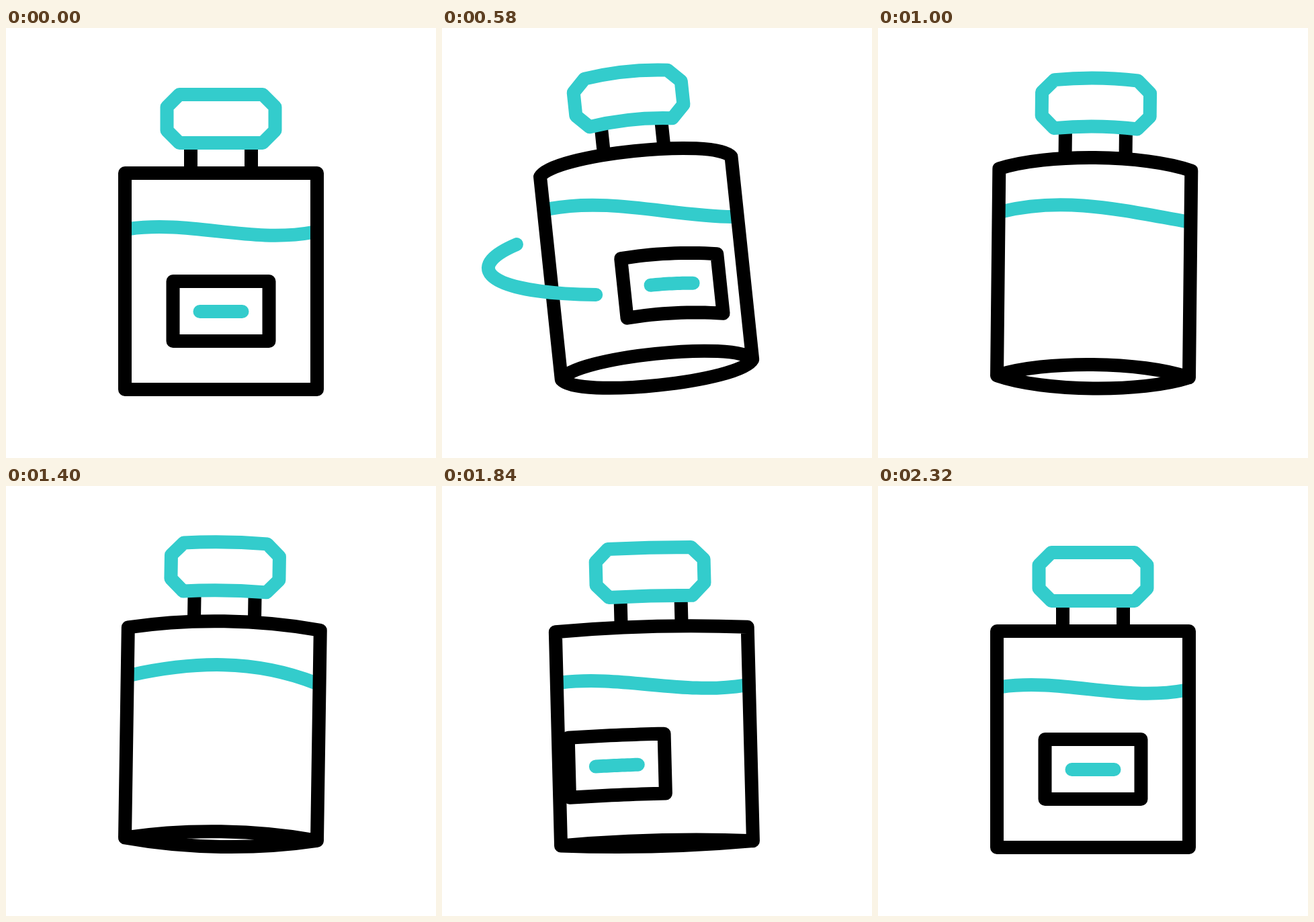
An HTML page with a canvas that plays this animation: 640 by 640 pixels, repeating every 2400 ms.

```html
<!DOCTYPE html>
<html lang="en">
<head>
<meta charset="utf-8">
<title>Bottle</title>
<style>
html, body { margin: 0; width: 100%; height: 100%; overflow: hidden; background: #fff; }
canvas { display: block; width: 640px; height: 640px; }
</style>
</head>
<body>
<canvas id="stage" width="640" height="640"></canvas>
<script>
const ctx = document.getElementById('stage').getContext('2d');
const LOOP = 2400, INK = '#000', TEAL = '#33cccc', HALF = 143, RAD = Math.PI / 180;

// Rows: time, value(s)
const TILT = [[120, 0], [470, -9.2], [840, 6.3], [1175, -5.8], [1535, 3.8], [1930, -2.2], [2150, 2.8], [2320, 0]];
const BULGE = [[120, 0], [220, 5], [340, 15.5], [440, 22.5], [500, 24.5], [580, 23.5],
  [1000, 17.8], [1400, 11.3], [1840, 4.5], [2140, 1], [2320, 0]];
const WATER = [[120, -3, -16, 19, 2], [340, -11, -25, 10, -8], [580, -18, -35, -7, -6],
  [1000, -20, -43, -21, -5], [1400, -15, -35, -39, -3], [1840, -6, -17, 13, -2], [2320, -3, -16, 19, 2]];

const clamp = x => Math.min(1, Math.max(0, x));
const sine = x => (1 - Math.cos(Math.PI * clamp(x))) / 2;
const linear = x => clamp(x);

function at(rows, t, ease) {
  let i = 0;
  while (i < rows.length - 2 && t > rows[i + 1][0]) i++;
  const a = rows[i], b = rows[i + 1];
  const p = ease((t - a[0]) / (b[0] - a[0]));
  return a.slice(1).map((v, k) => v + (b[k + 1] - v) * p);
}

function stroke(color, path, cap = 'butt') {
  ctx.strokeStyle = color;
  ctx.lineCap = cap;
  ctx.beginPath();
  path();
  ctx.stroke();
}

// Bow from the current left rim point to the right one
function bow(y, h, k) {
  const x = HALF * (1 - 2 * k), c = y - h * 4 / 3;
  ctx.bezierCurveTo(-x, c, x, c, HALF, y);
}

function drawBody(height, bulge) {
  const k = Math.max(0, (1 - (bulge / 25) ** 4) / 3);
  stroke(INK, () => {
    ctx.moveTo(-HALF, 0);
    ctx.lineTo(-HALF, -height);
    bow(-height, bulge, k);
    ctx.lineTo(HALF, 0);
    ctx.moveTo(-HALF, 0);
    bow(0, bulge, k);
    ctx.moveTo(-HALF, 0);
    bow(0, -bulge, k);
  }, 'round');
}

function drawCap(height, bulge) {
  const base = -height - 45 - 0.9 * bulge, top = base - 72, sag = 0.36 * bulge;
  stroke(INK, () => {
    for (const x of [-45, 45]) {
      ctx.moveTo(x, base);
      ctx.lineTo(x, -height - 0.85 * bulge);
    }
  });
  stroke(TEAL, () => {
    ctx.moveTo(-62, top);
    ctx.quadraticCurveTo(0, top - sag, 62, top);
    ctx.lineTo(80.5, top + 18.5);
    ctx.lineTo(80.5, base - 18.5);
    ctx.lineTo(62, base);
    ctx.quadraticCurveTo(0, base - sag, -62, base);
    ctx.lineTo(-80.5, base - 18.5);
    ctx.lineTo(-80.5, top + 18.5);
    ctx.closePath();
  });
}

function labelShift(t) {
  return t < 1200
    ? 35 * (Math.max(0, t - 300) / 280) ** 2.2
    : -57 * (Math.max(0, 2260 - t) / 420) ** 2.2;
}

function drawLabel(t, height, bulge) {
  const shift = labelShift(t), c = 0.7 * bulge;
  if (Math.abs(shift) > 230) return;
  // Wraps a point of the label round the bottle
  const point = (x, y) => {
    const px = x + shift;
    ctx.lineTo(px, y - 116.5 - c * (0.6 - (px / HALF) ** 2));
  };
  const row = (x0, x1, y) => {
    for (let i = 0; i <= 16; i++) point(x0 + (x1 - x0) * i / 16, y);
  };
  ctx.save();
  ctx.beginPath();
  ctx.rect(-HALF, -height, 2 * HALF, height);
  ctx.clip();
  stroke(INK, () => {
    row(-71.5, 71.5, -44.5);
    row(71.5, -71.5, 44.5);
    ctx.closePath();
  });
  stroke(TEAL, () => row(-31.5, 31.5, 0.5), 'round');
  ctx.restore();
}

function drawWater(t, x, y) {
  const [a, b, c, d] = at(WATER, t, linear);
  stroke(TEAL, () => {
    ctx.moveTo(x - 137, y + a);
    ctx.bezierCurveTo(x - 45, y + b, x + 45, y + c, x + 137, y + d);
  });
}

function drawSwoosh(t) {
  const head = sine((t - 420) / 360), tail = sine((t - 530) / 360);
  if (head <= 0 || tail >= 1) return;
  const angle = p => (228 - 276 * p) * RAD;
  stroke(TEAL, () => ctx.ellipse(323, 336, 255, 57, -5 * RAD, angle(tail), angle(head), true), 'round');
}

function draw(t) {
  const tilt = at(TILT, t, sine)[0] * RAD;
  const bulge = at(BULGE, t, linear)[0];
  const height = 322 - 0.79 * bulge;
  const floor = 538 - Math.hypot(HALF * Math.sin(tilt), bulge) - 0.08 * bulge;
  const level = 236 * height / 322;

  ctx.fillStyle = '#fff';
  ctx.fillRect(0, 0, 640, 640);
  ctx.lineWidth = 20;
  ctx.lineJoin = 'round';

  drawWater(t, 320 + level * Math.sin(tilt), floor - level * Math.cos(tilt));
  ctx.save();
  ctx.translate(320, floor);
  ctx.rotate(tilt);
  drawLabel(t, height, bulge);
  drawCap(height, bulge);
  drawBody(height, bulge);
  ctx.restore();
  drawSwoosh(t);
}

const start = performance.now();
function tick() {
  draw((performance.now() - start) % LOOP);
  requestAnimationFrame(tick);
}
tick();
</script>
</body>
</html>
```
